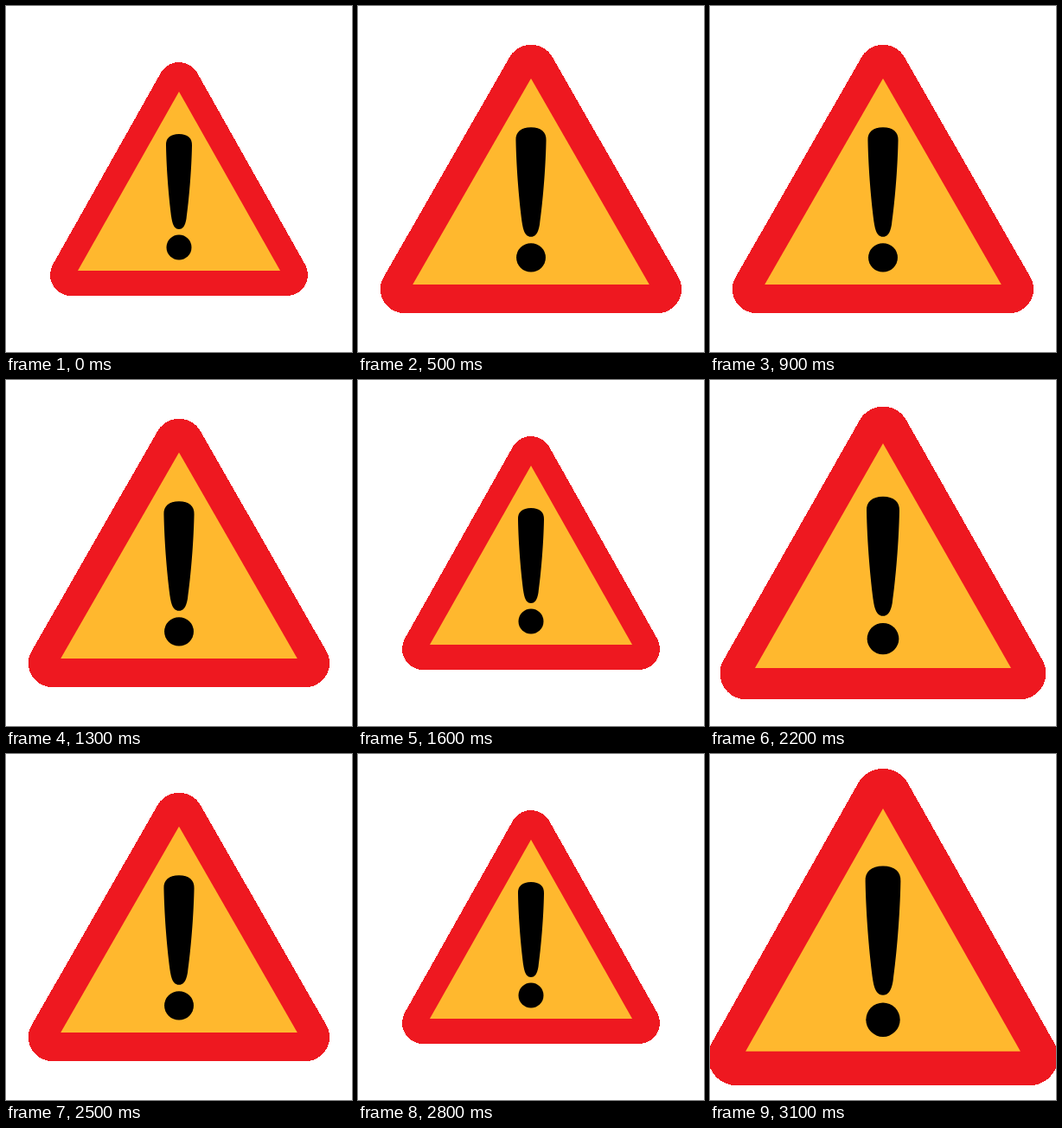
Write an HTML page that moves like this. It is 400 px wide and 400 px high and loops after 3200 ms.

```html
<!DOCTYPE html>
<html lang="en">
<head>
<meta charset="utf-8">
<title>Pulsing warning sign</title>
<style>
  html, body { margin: 0; width: 100%; height: 100%; overflow: hidden; background: #fff; }
  svg { display: block; width: 100%; height: 100%; }
</style>
</head>
<body>
<svg viewBox="0 0 400 400">
  <!-- Drawn around the centre at its smallest size -->
  <g id="sign">
    <path d="M0-110.8 124.8 110.8H-124.8Z" fill="#ee1820" stroke="#ee1820"
          stroke-width="48.4" stroke-linejoin="round" shape-rendering="crispEdges"/>
    <path d="M0-101 117 106H-117Z" fill="#ffb82e"/>
    <path d="M-15-39C-15.4-47-10-52 0-52S15.4-47 15-39C14.5-10 11.5 25 8.5 46C7 55 4 58 0 58S-7 55-8.5 46C-11.5 25-14.5-10-15-39Z"/>
    <circle cy="79" r="14.5"/>
  </g>
</svg>
<script>
  const STEP = 100;
  const SCALES = [[1, 1], [1.169, 1.15], [1.265, 1.255], [1.358, 1.357]];
  const sign = document.getElementById("sign");

  function draw() {
    const step = Math.floor(performance.now() / STEP) % SCALES.length;
    sign.setAttribute("transform", `translate(200 200) scale(${SCALES[step]})`);
    requestAnimationFrame(draw);
  }
  draw();
</script>
</body>
</html>
```
